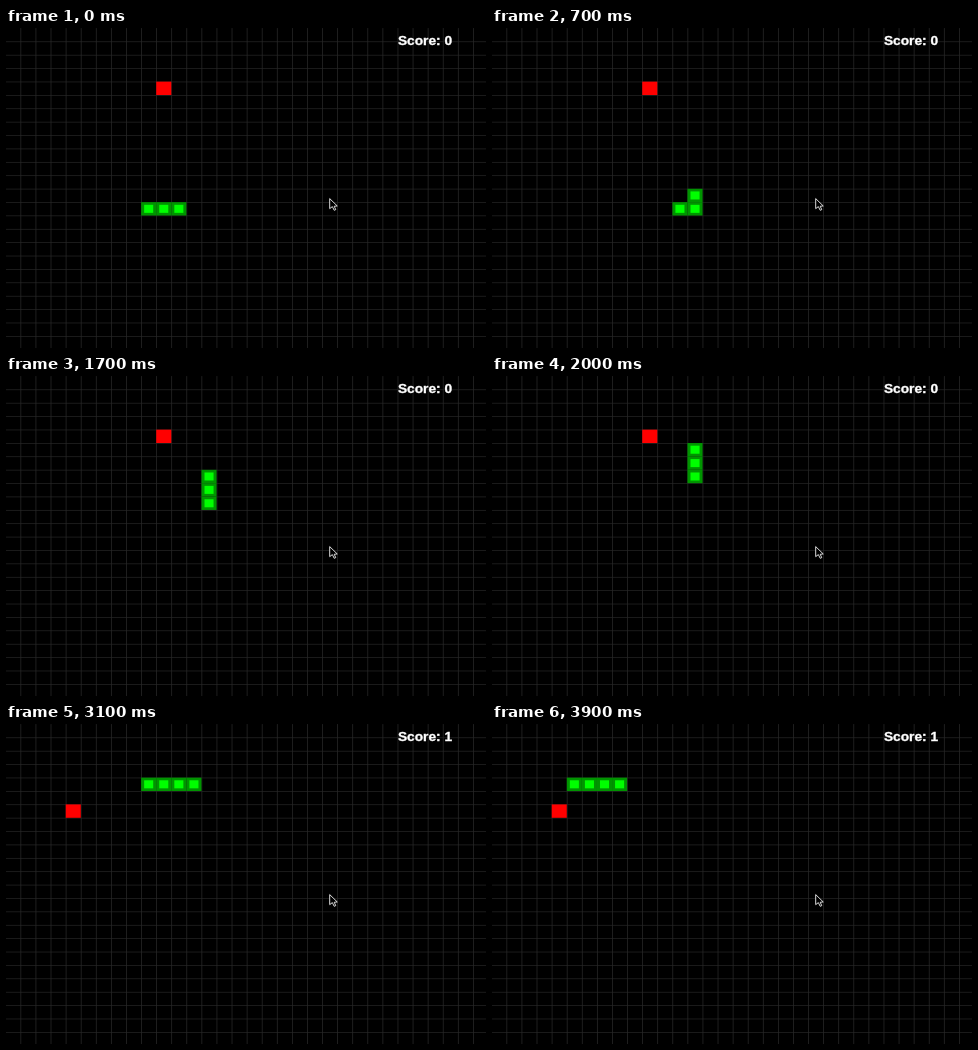
These frames come from a looping animation (480 px wide and 320 px high, 4 s). An HTML page with a canvas:

```html
<!DOCTYPE html>
<html>
<head>
<meta charset="utf-8">
<style>
html, body { margin: 0; width: 480px; height: 320px; overflow: hidden; background: #000; }
canvas { display: block; }
</style>
</head>
<body>
<canvas id="stage" width="480" height="320"></canvas>
<script>
const ctx = document.getElementById('stage').getContext('2d');
const LOOP = 4000, CELL = 20;

// The board is drawn in its own units and squeezed onto the stage
ctx.setTransform(0.75425, 0, 0, 0.6695, -0.627, 0.065);

// Times of the snake's steps, in tenths of a second
const steps = [2, 4, 6, 8, 10, 12, 14, 17, 18, 20, 23, 25, 27, 28, 31, 33, 35, 37, 39];
const EATEN = 15;

// Cells the head visits: right, up, then left
const path = [];
for (let x = 9; x < 13; x++) path.push([x, 13]);
for (let y = 13; y > 4; y--) path.push([13, y]);
for (let x = 13; x >= 5; x--) path.push([x, 4]);

function box(x, y, inset, color) {
  ctx.fillStyle = color;
  ctx.fillRect(x * CELL + inset, y * CELL + inset, CELL - 2 * inset, CELL - 2 * inset);
}

function drawGrid() {
  ctx.fillStyle = '#282828';
  for (let k = 1; k < 32; k++) ctx.fillRect(k * CELL, 0, 1, 480);
  for (let k = 1; k < 24; k++) ctx.fillRect(0, k * CELL, 640, 1);
}

function drawScore(score) {
  const text = 'Score: ' + score;
  ctx.font = 'bold 18.2px "Liberation Sans", Arial, sans-serif';
  ctx.fillStyle = ctx.strokeStyle = '#fff';
  ctx.lineWidth = 0.5;
  ctx.fillText(text, 520.5, 25);
  ctx.strokeText(text, 520.5, 25);
}

function drawPointer() {
  const points = [[0, 0], [0, 15], [3.5, 12], [6, 17.5], [8, 16.5], [6, 11.5], [10, 11]];
  ctx.beginPath();
  for (const [x, y] of points) ctx.lineTo(430 + x, 254.7 + y);
  ctx.closePath();
  ctx.fillStyle = '#000';
  ctx.fill();
  ctx.strokeStyle = '#fff';
  ctx.lineWidth = 1.2;
  ctx.stroke();
}

function draw(now) {
  const t = now % LOOP;
  const moves = steps.filter(s => s * 100 <= t).length;
  const score = moves >= EATEN ? 1 : 0;

  ctx.fillStyle = '#000';
  ctx.fillRect(-5, -5, 660, 500);
  drawGrid();
  for (const [x, y] of path.slice(moves - score, moves + 3)) {
    box(x, y, 0, '#009400');
    box(x, y, 4, '#0f0');
  }
  if (score) box(4, 6, 0, '#f00');
  else box(10, 4, 0, '#f00');
  drawScore(score);
  drawPointer();
}

function tick() {
  draw(performance.now());
  requestAnimationFrame(tick);
}
tick();
</script>
</body>
</html>
```
